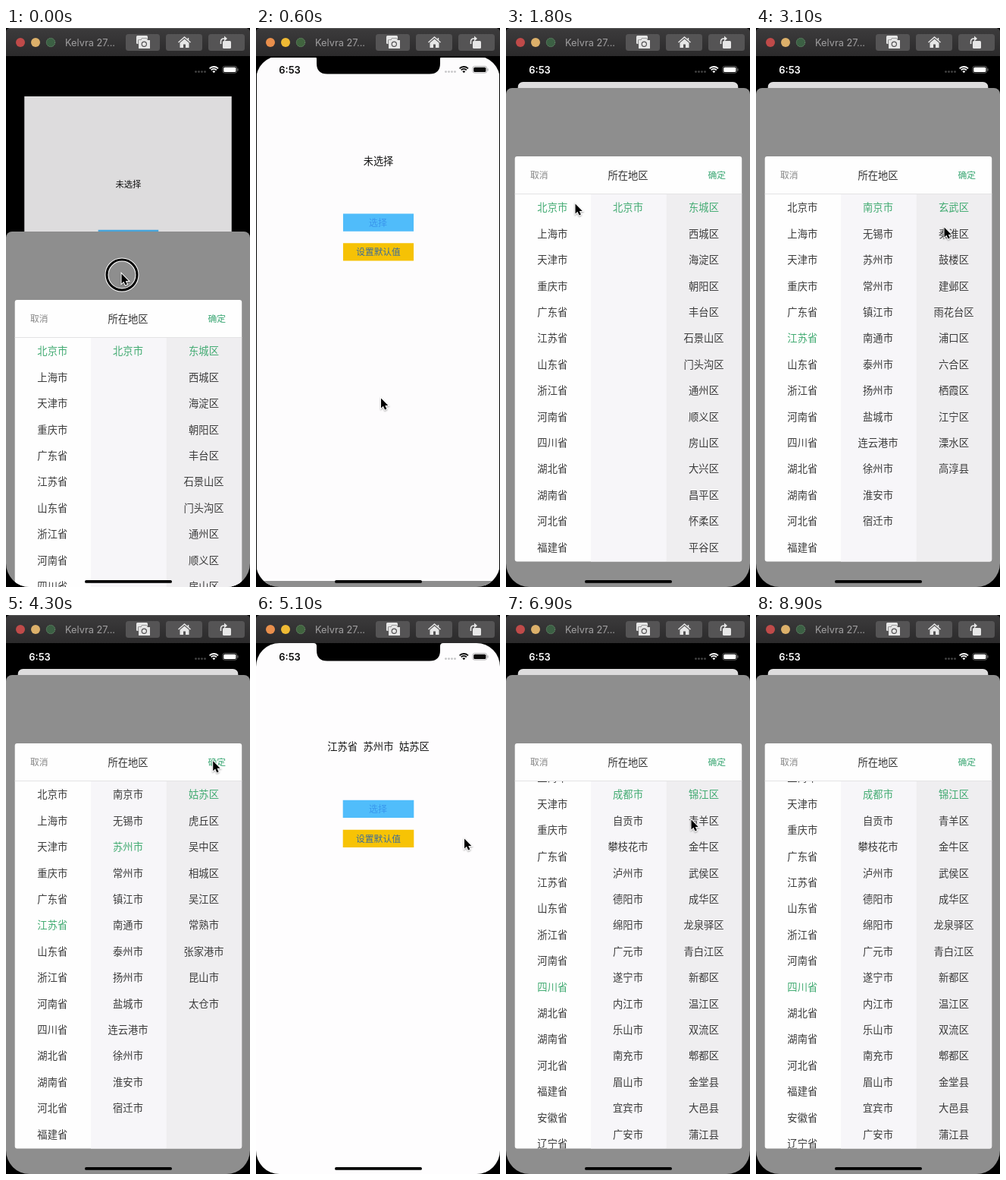
Recreate the animation shown at these times as an HTML page with a canvas. Size 322 px wide and 736 px high, loop 9000 ms.

```html
<!DOCTYPE html>
<html lang="zh-CN">
<head>
<meta charset="utf-8">
<title>Region picker</title>
<style>
html, body { margin: 0; width: 322px; height: 736px; overflow: hidden; background: #000; }
canvas { display: block; width: 322px; height: 736px; }
</style>
</head>
<body>
<canvas id="stage"></canvas>
<script>
const W = 322, H = 736, LOOP = 9000, BAR = 37, OPEN = 79, ROW = 34.4;
const FONT = 'Inter, "Noto Sans CJK SC", "Noto Sans CJK", sans-serif';
const ARROW = 'M.5 .5v13l2.900-2.700 2.200 4.800 2.300-1-2.100-4.700h4z';
const canvas = document.getElementById('stage');
const c = canvas.getContext('2d');
const dpr = window.devicePixelRatio || 1;
canvas.width = W * dpr;
canvas.height = H * dpr;

const names = (text, suffix = '') => text.split(' ').map(n => n + suffix);
const provinces = [...names('北京 上海 天津 重庆', '市'),
  ...names('广东 江苏 山东 浙江 河南 四川 湖北 湖南 河北 福建 安徽 辽宁', '省')];
const jiangsu = names('南京 无锡 苏州 常州 镇江 南通 泰州 扬州 盐城 连云港 徐州 淮安 宿迁', '市');

// Each picker state: start time, province, cities, chosen city, districts
const states = [
  [0, '北京市', ['北京市'], '北京市',
    names('东城 西城 海淀 朝阳 丰台 石景山 门头沟 通州 顺义 房山 大兴 昌平 怀柔 平谷', '区')],
  [2450, '江苏省', jiangsu, '南京市',
    [...names('玄武 秦淮 鼓楼 建邺 雨花台 浦口 六合 栖霞 江宁 溧水', '区'), '高淳县']],
  [3620, '江苏省', jiangsu, '苏州市',
    [...names('姑苏 虎丘 吴中 相城 吴江', '区'), ...names('常熟 张家港 昆山 太仓', '市')]],
  [6520, '四川省',
    names('成都 自贡 攀枝花 泸州 德阳 绵阳 广元 遂宁 内江 乐山 南充 眉山 宜宾 广安', '市'), '成都市',
    [...names('锦江 青羊 金牛 武侯 成华 龙泉驿 青白江 新都 温江 双流 郫都', '区'),
      ...names('金堂 大邑 蒲江', '县')]]
];

const sheetKeys = [[0, 268], [330, 432], [630, H], [1250, H], [1650, OPEN],
  [4650, OPEN], [5050, H], [5650, H], [6050, OPEN]];
const scaleKeys = [[0, .85], [330, .9], [645, 1], [1250, 1], [1650, .904],
  [4650, .904], [5050, 1], [5650, 1], [6050, .904]];
const scrollKeys = [[6150, 0], [6400, 56.4]];
const cursorKeys = [[0, 152, 323], [330, 164.5, 487], [600, 164.5, 487], [1050, 160, 256],
  [1300, 160, 256], [1800, 91, 231], [2300, 66, 404], [2550, 66, 404], [3100, 248, 262],
  [3450, 165, 302], [3700, 165, 302], [4350, 274.5, 190], [4650, 274.5, 190], [5100, 274.5, 294],
  [5450, 164, 254], [5700, 164, 254], [6150, 66, 520], [6400, 66, 464], [6470, 66, 487],
  [6600, 66, 487], [6900, 244, 269], [7500, 345, 300]];
const presses = [[0, 330], [1150, 1300], [2400, 2550], [3550, 3700], [4500, 4650],
  [5550, 5700], [6150, 6400], [6480, 6600]];

function at(keys, t, i = 1) {
  const n = keys.findIndex(k => k[0] > t);
  if (n < 0) return keys[keys.length - 1][i];
  if (n === 0) return keys[0][i];
  const a = keys[n - 1], b = keys[n], u = (t - a[0]) / (b[0] - a[0]);
  return a[i] + (b[i] - a[i]) * u * u * (3 - 2 * u);
}

function box(x, y, w, h, fill, r = 0) {
  c.fillStyle = fill;
  c.beginPath();
  c.roundRect(x, y, w, h, r);
  c.fill();
}

function disc(x, y, r, fill) {
  c.fillStyle = fill;
  c.beginPath();
  c.arc(x, y, r, 0, 7);
  c.fill();
}

function ring(x, y, r, ink, width, from = 0, to = 7) {
  c.strokeStyle = ink;
  c.lineWidth = width;
  c.beginPath();
  c.arc(x, y, r, from, to);
  c.stroke();
}

// Text placed by its visual centre line
function write(text, x, y, size, fill, weight = 400, align = 'center') {
  c.font = `${weight} ${size}px ${FONT}`;
  c.textAlign = align;
  c.fillStyle = fill;
  c.fillText(text, x, y + size * .375);
}

function shape(d, fill, stroke, width = 1) {
  const p = new Path2D(d);
  if (stroke) {
    c.strokeStyle = stroke;
    c.lineWidth = width;
    c.stroke(p);
  }
  if (fill) {
    c.fillStyle = fill;
    c.fill(p);
  }
}

function titleBar(bright) {
  const g = c.createLinearGradient(0, 0, 0, BAR);
  g.addColorStop(0, '#3c3b3c');
  g.addColorStop(1, '#2b2a2b');
  box(0, 0, W, BAR, g, [5, 5, 0, 0]);
  box(4, 0, W - 8, 1, '#5a5a5a');
  const lights = bright ? ['#e98f4c', '#efba34', '#41643f'] : ['#bf4a49', '#dcb06a', '#3c6044'];
  lights.forEach((fill, i) => disc(19 + i * 20, 19, 6, fill));
  c.setLineDash([1, 1]);
  ring(59, 19, 5.7, '#7d9f80', .8);
  c.setLineDash([]);
  write('Kelvra 27...', 78, 19, 12.8, '#a09fa0', 400, 'left');

  const key = '#555455', ink = '#e6e6e6';
  [[158, 45], [211, 48], [267, 48]].forEach(([x, w]) => box(x, 8, w, 22, key, 3.5));
  box(172, 10, 15, 11, ink, 1.5);
  shape('M175 16h3l1.5-2h6l1.5 2h3v11h-15z', ink, key, 1.2);
  ring(182.3, 21.3, 3.1, key, 1.2);
  shape('M229.5 19.5v6.5h4.5v-4.5h3v4.5h4.5v-6.5l-6-5z', ink);
  shape('M227.5 19l8-7 8 7M240.5 13v3', null, ink, 1.5);
  box(286, 17, 11, 10, ink, 1.5);
  shape('M283.5 21v-3q0-4 4-4h1', null, ink, 1.6);
  shape('M288 10.5v7l4-3.5z', ink);
}

function page(t, scale, dim) {
  c.save();
  c.translate(161, 390);
  c.scale(scale, scale);
  c.translate(-161, -390);
  c.beginPath();
  c.roundRect(0, BAR, W, H - BAR, t < 640 ? 0 : [8, 8, 0, 0]);
  c.clip();
  box(0, BAR, W, H, '#fefdfe');
  write(t < 4600 ? '未选择' : '江苏省  苏州市  姑苏区', 161.5, 173.5, 13.3, '#151515');
  box(114.7, 243.7, 93.6, 23.3, '#50bdfb');
  write('选择', 161, 255.5, 12, '#3a98ee', 500);
  box(114.7, 282.7, 93.6, 23.3, '#f7c305');
  write('设置默认值', 161.5, 294.5, 11.8, '#3b6c9c', 500);
  box(0, BAR, W, H, `rgba(0,0,0,${dim})`);
  c.restore();
}

function column(list, chosen, x, top, scroll = 0) {
  list.forEach((name, i) =>
    write(name, x, top + 157.5 + i * ROW - scroll, 13.3, name === chosen ? '#42ab72' : '#3a3a3a'));
}

function sheet(t, top) {
  if (top >= H) return;
  const local = t >= 5050 && t < 6520 ? 0 : t;
  const [, province, cities, city, districts] = states.filter(s => s[0] <= local).pop();
  box(0, top, W, H, '#8e8e8e', [8, 8, 0, 0]);
  c.save();
  c.beginPath();
  c.roundRect(11.7, top + 90, 299.5, 533.5, 3);
  c.clip();
  box(11, top + 90, 301, 534, '#fefefe');
  box(112, top + 139, 99.5, 485, '#f7f6f9');
  box(211.5, top + 139, 100, 485, '#efeef0');
  write('取消', 32, top + 115, 11.8, '#858585', 400, 'left');
  write('所在地区', 161, top + 115, 13.3, '#303030', 500);
  write('确定', 290, top + 115, 11.8, '#3ba774', 500, 'right');
  box(11, top + 139, 301, 1, '#e3e3e4');
  c.beginPath();
  c.rect(11, top + 140, 301, 484);
  c.clip();
  column(provinces, province, 61.3, top, at(scrollKeys, t));
  column(cities, city, 161, top);
  column(districts, districts[0], 261, top);
  c.restore();
}

function statusBar(t, light) {
  const ink = light ? '#0a0a0a' : '#fff', rim = light ? '#a5a5a7' : '#777';
  if (light || t > 400) write('6:53', 44.5, 54.8, 12.9, ink, 600);
  for (let i = 0; i < 4; i++) disc(250.5 + i * 4, 57.6, 1.4, light ? '#c4c4c6' : '#444');
  [7.8, 4.9].forEach(r => ring(274.3, 58.8, r, ink, 1.8, -Math.PI * .76, -Math.PI * .24));
  shape('M274.3 59.3l-2-2.200q2-1.600 4 0z', ink);
  c.strokeStyle = rim;
  c.lineWidth = .8;
  c.beginPath();
  c.roundRect(285.9, 50.4, 18.8, 8.8, 2.6);
  c.stroke();
  box(287.2, 51.7, 16.2, 6.2, ink, 1.5);
  box(305.4, 53.2, 1.1, 3.2, rim, .5);
}

function pointer(t) {
  const x = at(cursorKeys, t), y = at(cursorKeys, t, 2);
  if (x > W + 20) return;
  if (presses.some(([a, b]) => t >= a && t < b)) {
    ring(x + 1, y + 2, 20, '#fff', 5);
    ring(x + 1, y + 2, 20, '#000', 3);
  }
  c.save();
  c.translate(x, y);
  c.shadowColor = 'rgba(0,0,0,.35)';
  c.shadowBlur = 2;
  c.shadowOffsetY = 1;
  shape(ARROW, null, '#fff', 2);
  c.shadowColor = 'transparent';
  shape(ARROW, '#000');
  c.restore();
}

function draw(t) {
  const top = at(sheetKeys, t), scale = at(scaleKeys, t), light = scale > .95;
  c.setTransform(dpr, 0, 0, dpr, 0, 0);
  box(0, 0, W, H, '#000');
  titleBar(light);
  c.save();
  c.beginPath();
  c.roundRect(0, BAR, W, H - BAR, 31);
  c.clip();
  page(t, scale, .13 * Math.min(1, (H - top) / 450));
  sheet(t, top);
  c.restore();
  if (light) {
    shape('M76 37q4 0 4 4v5.500q0 14 14 14h135q14 0 14-14v-5.500q0-4 4-4z', '#000');
  }
  statusBar(t, light);
  box(104, 727, 115, 3.8, '#000', 2);
  pointer(t);
}

const start = performance.now();
function tick() {
  draw((performance.now() - start) % LOOP);
  requestAnimationFrame(tick);
}
tick();
</script>
</body>
</html>
```
